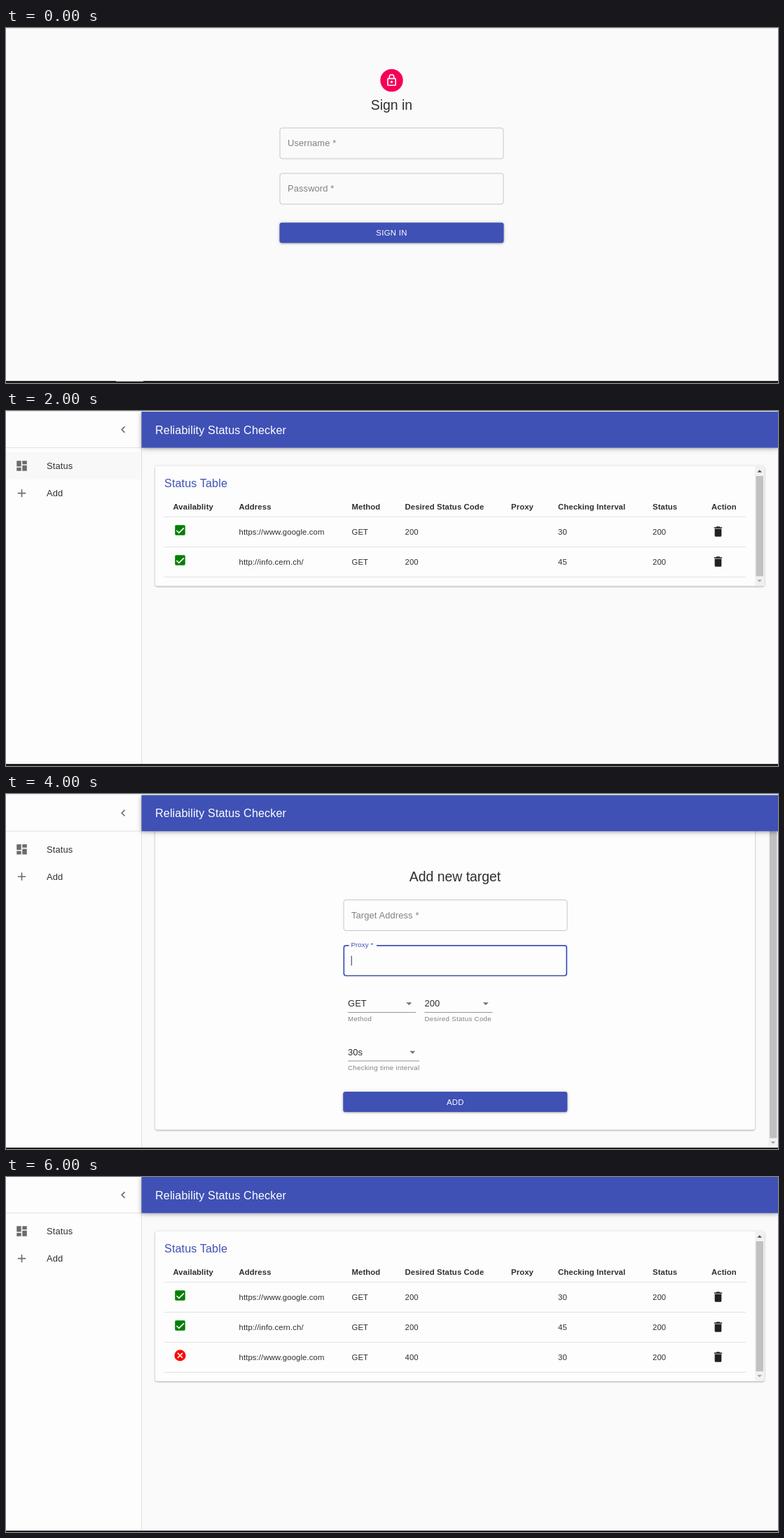
These frames come from a looping animation (1102 by 508 pixels, 8000 ms). An HTML page:

```html
<!DOCTYPE html>
<html lang="en">
<head>
<meta charset="utf-8">
<title>Reliability Status Checker</title>
<style>
  html, body { margin: 0; width: 100%; height: 100%; overflow: hidden; background: #fafafa; }
  svg { display: block; width: 1102px; height: 508px; }
  text { font-family: "Liberation Sans", Arial, sans-serif; fill: #2f2f2f; white-space: pre; }
  .h5 { font-size: 19.4px; }
  .h6 { font-size: 16.15px; letter-spacing: .0075em; }
  .body { font-size: 12.9px; letter-spacing: .00938em; }
  .cell { font-size: 11.3px; letter-spacing: .01071em; }
  .head { font-weight: 700; }
  .btn { font-size: 11.3px; letter-spacing: .02857em; }
  .help { font-size: 9.7px; letter-spacing: .0333em; }
  .label { font-size: 9.7px; letter-spacing: .00938em; }
  .muted { fill: #818181; }
  .blue { fill: #3f51b5; }
  .white { fill: #fff; }
  .paper { filter: drop-shadow(0 1px .8px rgba(0,0,0,.28)) drop-shadow(0 .8px 1.6px rgba(0,0,0,.1)); }
  .raised { filter: drop-shadow(0 1.4px 1px rgba(0,0,0,.28)) drop-shadow(0 .8px 2.5px rgba(0,0,0,.14)); }
  .bar { filter: drop-shadow(0 1.6px 2.4px rgba(0,0,0,.26)) drop-shadow(0 1.6px 4px rgba(0,0,0,.16)); }
</style>
</head>
<body>
<svg id="stage" viewBox="0 0 1102 508" xmlns="http://www.w3.org/2000/svg"></svg>
<script>
const stage = document.getElementById('stage');
const BLUE = '#3f51b5';
const SCALE = 0.807;

const text = (x, y, cls, s, anchor = 'start') =>
  `<text x="${x}" y="${y}" class="${cls}" text-anchor="${anchor}">${s}</text>`;
const rect = (x, y, w, h, fill, extra = '') =>
  `<rect x="${x}" y="${y}" width="${w}" height="${h}" fill="${fill}" ${extra}/>`;
const hline = (x1, x2, y, color) => rect(x1, y, x2 - x1, 1, color);
const shift = (dy, body) => `<g transform="translate(0 ${dy})">${body}</g>`;

// Icons live on a 24-unit grid and are placed by their centre.
const icons = {
  lock: '<g fill="none" stroke="currentColor" stroke-width="2"><rect x="5" y="9" width="14" height="12" rx="1"/>' +
    '<path d="M8 9V6a4 4 0 0 1 8 0v3"/></g><circle cx="12" cy="15" r="2"/>',
  board: '<path d="M3 3h8v10H3zM3 15h8v6H3zM13 11h8v10h-8zM13 3h8v6h-8z"/>',
  plus: '<path d="M11 5h2v6h6v2h-6v6h-2v-6H5v-2h6z"/>',
  back: '<path d="M14.7 6.7L9.4 12l5.3 5.3" fill="none" stroke="currentColor" stroke-width="2"/>',
  check: '<rect x="3" y="3" width="18" height="18" rx="2"/>' +
    '<path d="M5.7 12.7L10 17l8.7-8.7" fill="none" stroke="#fff" stroke-width="2"/>',
  cross: '<circle cx="12" cy="12" r="10"/>' +
    '<path d="M7.7 7.7l8.6 8.6M16.3 7.7l-8.6 8.6" stroke="#fff" stroke-width="2"/>',
  bin: '<path d="M6 7h12v12a2 2 0 0 1-2 2H8a2 2 0 0 1-2-2zM5 4h3.5l1-1h5l1 1H19v2H5z"/>',
  down: '<path d="M7 10l5 5 5-5z"/>'
};
const icon = (name, cx, cy, color) =>
  `<g transform="translate(${cx} ${cy}) scale(${SCALE}) translate(-12 -12)" fill="${color}" color="${color}">${icons[name]}</g>`;

const button = (x, y, s) =>
  rect(x, y, 320, 29, BLUE, 'rx="3.2" class="raised"') + text(x + 160, y + 18.5, 'btn white', s, 'middle');

const field = (x, y, s) =>
  rect(x + .5, y + .5, 319, 44, 'none', 'rx="3.2" stroke="#c6c6c6"') + text(x + 11.5, y + 26.6, 'body muted', s);

const select = (x, y, width, value, help) =>
  text(x, y, 'body', value) + icon('down', x + width - 9.7, y - 4.2, '#757575') +
  hline(x, x + width, y + 8, '#949494') + text(x, y + 21.3, 'help muted', help);

const arrow = (cx, cy, dir, color) =>
  `<path d="M${cx - 3.3} ${cy + 1.7 * dir}h6.6l-3.3 ${-3.4 * dir}z" fill="${color}"/>`;

const bottomBand = y => rect(0, y, 1102, 508 - y, '#211c20');

function shell(dy, statusActive) {
  return shift(dy,
    rect(0, 0, 193, 508, '#fdfdfd') +
    rect(193, 0, 1, 508, '#e0e0e0') +
    hline(0, 193, 51, '#e2e2e2') +
    (statusActive ? rect(0, 58, 193, 39, '#f8f8f8') : '') +
    icon('back', 167.3, 25.6, '#6c6c6c') +
    icon('board', 22.5, 77.6, '#6c6c6c') + text(58, 82, 'body', 'Status') +
    icon('plus', 22.5, 116.6, '#6c6c6c') + text(58, 121, 'body', 'Add') +
    rect(193.5, 0, 909, 51.6, BLUE, 'class="bar"') +
    text(213, 31.5, 'h6 white', 'Reliability Status Checker'));
}

const columns = [238.5, 332.5, 493.5, 569.5, 721, 788, 923, 1007];
const titles = ['Availablity', 'Address', 'Method', 'Desired Status Code', 'Proxy',
  'Checking Interval', 'Status', 'Action'];
const targets = [
  ['https://www.google.com', 200, 30, true],
  ['http://info.cern.ch/', 200, 45, true],
  ['https://www.google.com', 400, 30, false]
];

function tableRow([address, code, interval, ok], i) {
  const y = Math.round(i * 42.8);
  const cells = ['', address, 'GET', code, '', interval, 200];
  return shift(y,
    icon(ok ? 'check' : 'cross', 248.5, 169.4, ok ? '#008000' : '#f00') +
    cells.map((s, c) => text(columns[c], 176, 'cell', s)).join('') +
    icon('bin', 1016.5, 171.6, '#212121') +
    hline(226, 1056, 193, '#e2e2e2'));
}

function statusScreen(dy, count, active, bandY) {
  const bottom = 249.4 + (count - 2) * 42.8;
  return shell(dy, active) + shift(dy,
    rect(213, 77.5, 869.5, bottom - 77.5, '#fdfdfd', 'rx="3.2" class="paper"') +
    rect(1069, 78, 13.5, bottom - 78.5, '#f1f1f1') +
    rect(1070.5, 92, 10.5, bottom - 106, '#c1c1c1') +
    arrow(1075.7, 85, 1, '#505050') + arrow(1075.7, bottom - 7.3, -1, '#a3a3a3') +
    text(226, 108, 'h6 blue', 'Status Table') +
    titles.map((s, i) => text(columns[i], 139.5, 'cell head', s)).join('') +
    hline(226, 1056, 150, '#e2e2e2') +
    targets.slice(0, count).map(tableRow).join('')) +
    (dy ? hline(0, 1102, 0, '#e4e4e4') : '') + bottomBand(bandY);
}

function signInScreen() {
  return hline(0, 1102, 0, '#e0e0e0') +
    '<circle cx="550.5" cy="75" r="16.2" fill="#f50057"/>' +
    icon('lock', 550.5, 74.8, '#fff') +
    text(550.5, 117.3, 'h5', 'Sign in', 'middle') +
    field(390.5, 142.5, 'Username *') +
    field(390.5, 207.5, 'Password *') +
    button(390.5, 278.5, 'SIGN IN') +
    bottomBand(505) + hline(157, 196, 505, '#bbb');
}

function addScreen() {
  return rect(213, 30, 856, 450.5, '#fdfdfd', 'rx="3.2" class="paper"') +
    rect(1088.5, 50, 13.5, 456, '#f1f1f1') +
    rect(1090, 50, 10.5, 442.5, '#c1c1c1') +
    arrow(1095, 499, -1, '#a3a3a3') +
    text(641, 125.2, 'h5', 'Add new target', 'middle') +
    field(481.5, 151, 'Target Address *') +
    rect(482.3, 216.8, 318, 43.2, 'none', `rx="3.2" stroke="${BLUE}" stroke-width="1.7"`) +
    rect(489.5, 215, 39.5, 4, '#fdfdfd') +
    text(492.5, 219, 'label blue', 'Proxy *') +
    rect(492.7, 231.5, 1, 14, '#333') +
    select(488, 304, 97, 'GET', 'Method') +
    select(597.5, 304, 97, 200, 'Desired Status Code') +
    select(488, 373.5, 102, '30s', 'Checking time interval') +
    button(481.3, 426, 'ADD') +
    shell(1.6, false) +
    rect(0, 0, 1102, 1, '#ededed') + bottomBand(506);
}

const STEP = 2000;
const screens = [
  signInScreen(),
  statusScreen(1, 2, true, 505),
  addScreen(),
  statusScreen(0, 3, false, 506)
];
const background = rect(0, 0, 1102, 508, '#fafafa');
let shown = -1;

function draw(now) {
  const i = Math.floor(now / STEP) % screens.length;
  if (i !== shown) {
    shown = i;
    stage.innerHTML = background + screens[i];
  }
}

function tick() {
  draw(performance.now());
  requestAnimationFrame(tick);
}
tick();
</script>
</body>
</html>
```
